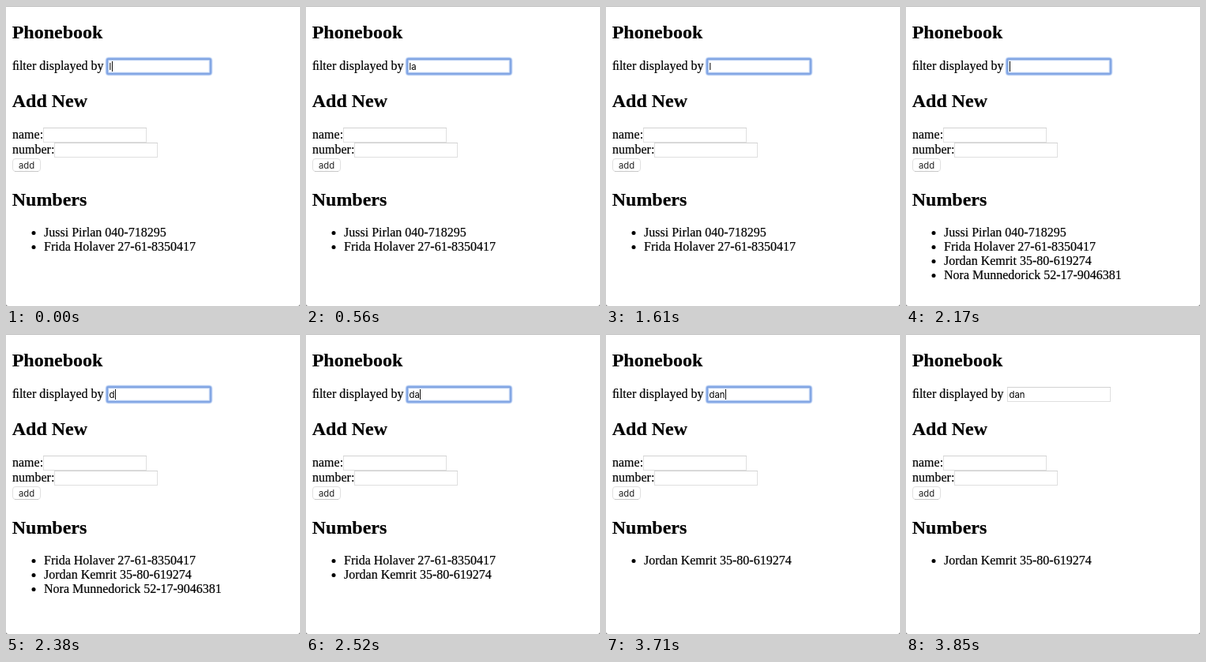
Write an HTML page with a canvas that moves like this. It is 372 by 380 pixels and loops after 3990 ms.

```html
<!DOCTYPE html>
<html lang="en">
<head>
<meta charset="utf-8">
<title>Phonebook</title>
<style>
  html, body { margin: 0; width: 372px; height: 380px; overflow: hidden; background: #fff; }
  canvas { display: block; width: 372px; height: 380px; }
</style>
</head>
<body>
<canvas id="stage"></canvas>
<script>
const W = 372, H = 380, LOOP = 3990;
const SERIF = '"Liberation Serif", "Times New Roman", serif';
const UI = '11.3px Inter, "Liberation Sans", sans-serif';

const people = [
  'Jussi Pirlan 040-718295',
  'Frida Holaver 27-61-8350417',
  'Jordan Kemrit 35-80-619274',
  'Nora Munnedorick 52-17-9046381'
];

// [start in ms, filter text]
const typing = [
  [0, 'l'], [70, 'la'], [1540, 'l'], [1820, ''],
  [2380, 'd'], [2520, 'da'], [2660, 'dan']
];
// Times at which the caret switches between visible and hidden
const blinks = [560, 1120, 1610, 2170, 3150, 3710];
const BLUR = 3850;

const canvas = document.getElementById('stage');
const ctx = canvas.getContext('2d');
const ratio = window.devicePixelRatio || 1;
canvas.width = Math.round(W * ratio);
canvas.height = Math.round(H * ratio);
ctx.scale(ratio, ratio);

function text(str, x, y, font, color = '#000') {
  ctx.font = font;
  ctx.fillStyle = color;
  ctx.fillText(str, x, y);
}

// Page text is drawn slightly heavier than the font's plain outline
function pageText(str, x, y, font) {
  text(str, x, y, font);
  ctx.lineWidth = 0.2;
  ctx.strokeStyle = '#000';
  ctx.strokeText(str, x, y);
}

function roundRect(x, y, w, h, r) {
  ctx.beginPath();
  ctx.roundRect(x, y, w, h, r);
}

const heading = (str, y) => pageText(str, 7.7, y, 'bold 24px ' + SERIF);
const body = (str, x, y) => pageText(str, x, y, '16px ' + SERIF);

function field(x, y) {
  ctx.lineWidth = 1;
  ctx.strokeStyle = '#dfdfdf';
  ctx.strokeRect(x + 0.5, y + 0.5, 130, 18);
  ctx.fillStyle = '#d2d2d2';
  ctx.fillRect(x, y, 131, 1);
}

function focusRing(x, y) {
  const layers = [[5.6, 0.14], [4, 0.3], [2.4, 0.6]];
  for (const [width, alpha] of layers) {
    ctx.lineWidth = width;
    ctx.strokeStyle = `rgba(100, 146, 226, ${alpha})`;
    roundRect(x, y, 131, 19, 2);
    ctx.stroke();
  }
}

function button() {
  ctx.strokeStyle = '#e0e0e0';
  ctx.lineWidth = 1;
  roundRect(8.5, 193.5, 35, 16, 3.5);
  ctx.stroke();
  ctx.fillStyle = '#c8c8c8';
  ctx.fillRect(11, 209, 30, 1);
  ctx.textAlign = 'center';
  text('add', 26, 206, UI, '#222');
  ctx.textAlign = 'left';
}

function windowEdge() {
  ctx.fillStyle = '#bdbdbd';
  ctx.fillRect(0, 0, W, 1);
  ctx.fillStyle = '#777';
  ctx.beginPath();
  ctx.rect(0, H - 12, W, 12);
  ctx.roundRect(0, H - 12, W, 12, [0, 0, 3, 3]);
  ctx.fill('evenodd');
}

function filterBox(query, focused, caret) {
  body('\uFB01lter displayed by', 8, 81); // "fi" ligature
  field(128, 67);
  if (focused) focusRing(128, 67);
  text(query, 130.6, 81, UI);
  if (focused && caret) {
    const x = Math.ceil(130.6 + ctx.measureText(query).width);
    ctx.fillStyle = '#111';
    ctx.fillRect(x, 70, 1, 13);
  }
}

function list(query) {
  people
    .filter(p => p.toLowerCase().includes(query))
    .forEach((p, i) => {
      const y = 292 + i * 18;
      ctx.fillStyle = '#000';
      ctx.beginPath();
      ctx.arc(35, y - 4.5, 2.5, 0, Math.PI * 2);
      ctx.fill();
      body(p, 48, y);
    });
}

function draw(t) {
  const query = typing.filter(([start]) => start <= t).pop()[1];
  const caret = blinks.filter(b => b <= t).length % 2 === 0;

  ctx.fillStyle = '#fff';
  ctx.fillRect(0, 0, W, H);
  windowEdge();

  heading('Phonebook', 41);
  filterBox(query, t < BLUR, caret);

  heading('Add New', 128);
  body('name:', 8, 168);
  field(47, 154);
  body('number:', 8, 187);
  field(61, 173);
  button();

  heading('Numbers', 253);
  list(query);
}

const begin = performance.now();
function tick() {
  draw((performance.now() - begin) % LOOP);
  requestAnimationFrame(tick);
}
tick();
</script>
</body>
</html>
```
